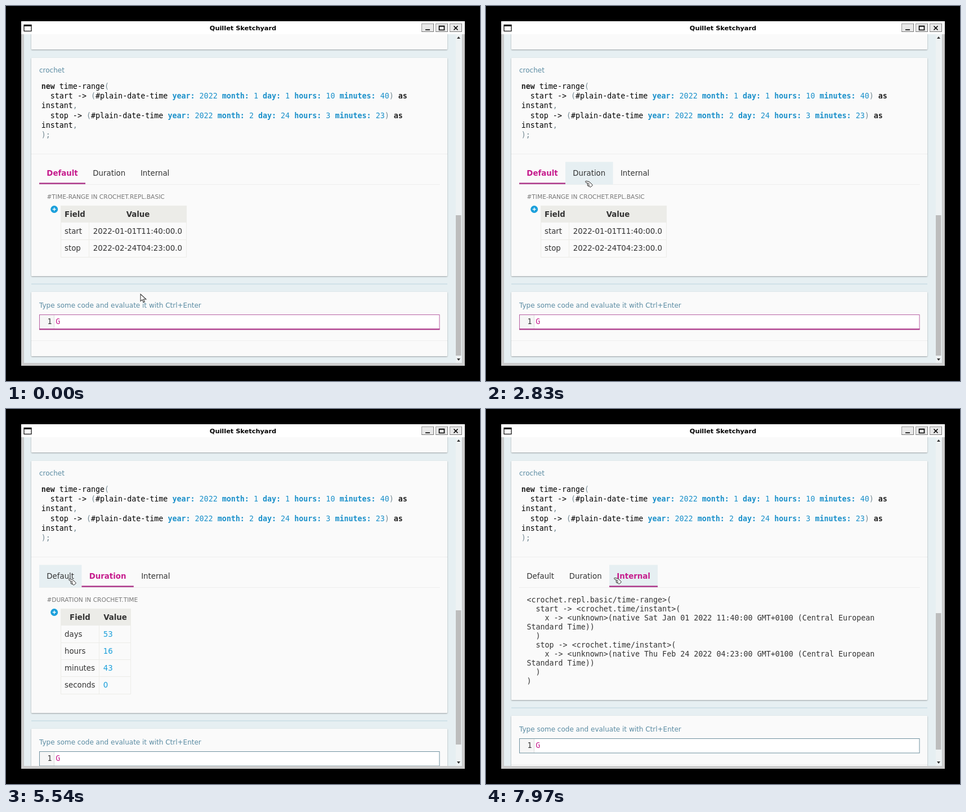
Write an HTML page that moves like this. It is 842 px wide and 665 px high and loops after 8000 ms.

```html
<!DOCTYPE html>
<html lang="en">
<head>
<meta charset="utf-8">
<title>Quillet Sketchyard</title>
<style>
html, body { margin: 0; width: 100%; height: 100%; overflow: hidden; background: #000; }
svg { display: block; }
text { white-space: pre; font: 13.333px "DejaVu Sans", sans-serif; fill: #333; }
.mono { font-family: "DejaVu Sans Mono", monospace; }
.code { fill: #000; }
.bold, .word, .key { font-weight: bold; }
.word { fill: #222; }
.key, .num { fill: #1a90ca; }
.punct { fill: #738892; }
.label { font-size: 12px; fill: #5b8ca3; }
.type { font-size: 10.667px; fill: #777; }
.title { font-size: 11.333px; font-weight: bold; fill: #000; }
.value { fill: #1a9fdb; }
.pink { fill: #c61c8d; }
.mid { text-anchor: middle; }
.card { fill: #fafafa; filter: drop-shadow(0 1px 1px #0005); }
.dots { stroke: #e2e2e2; stroke-dasharray: 1 1; }
.cell { fill: none; stroke: #ecece8; }
</style>
</head>
<body>
<svg id="stage" width="842" height="665" viewBox="0 0 842 665"></svg>
<script>
const LOOP = 8000;
const TABS = ["Default", "Duration", "Internal"];
const PLAIN_WIDTH = [75.4, 84.6, 78.4];
const ACTIVE_WIDTH = [82, 92.4, 86];
const BLUR_AT = 3470;
// time, selected tab
const SELECTIONS = [[0, 0], [3530, 1], [5770, 0], [7000, 2]];
// content shift, scroll thumb top and height for each tab
const LAYOUT = [[0, 371, 249], [60, 357, 238], [37, 362, 242]];
// time, x, y of the pointer
const PATH = [
  [0, 239, 511], [30, 239, 511], [400, 400, 580], [830, 630, 540], [860, 630, 540],
  [1260, 568, 432], [1450, 420, 300], [1630, 210, 256], [1720, 186, 292],
  [2130, 173, 306], [2400, 175, 309], [2570, 175, 309], [3330, 177, 311],
  [5000, 177, 311], [5370, 111, 301], [6070, 111, 301], [6670, 288, 305],
  [7870, 288, 305], [7970, 227, 299], [8000, 227, 299]
];

const escapeText = s => s.replace(/&/g, "&amp;").replace(/</g, "&lt;");
const text = (x, y, s, cls = "") => `<text x="${x}" y="${y}" class="${cls}">${escapeText(s)}</text>`;
const rect = (x, y, w, h, fill) => `<rect x="${x}" y="${y}" width="${w}" height="${h}" fill="${fill}"/>`;
const card = (y, h) => `<rect class="card" x="45" y="${y}" width="739" height="${h}" rx="1"/>`;
const path = (d, attrs) => `<path d="${d}" ${attrs}/>`;
const dots = (x1, x2, y) => path(`M${x1} ${y}H${x2}`, 'class="dots"');

const SOURCE = `new time-range(
  start -> (#plain-date-time year: 2022 month: 1 day: 1 hours: 10 minutes: 40) as
instant,
  stop -> (#plain-date-time year: 2022 month: 2 day: 24 hours: 3 minutes: 23) as
instant,
);`;

const INTERNAL = `<crochet.repl.basic/time-range>(
  start -> <crochet.time/instant>(
    x -> <unknown>(native Sat Jan 01 2022 11:40:00 GMT+0100 (Central European
Standard Time))
  )
  stop -> <crochet.time/instant>(
    x -> <unknown>(native Thu Feb 24 2022 04:23:00 GMT+0100 (Central European
Standard Time))
  )
)`;

function highlight(line) {
  return line.replace(/\b(new|as)\b|([a-z]+:)|(\d+)|([(),;]+)/g, (s, word, key, num) =>
    `<tspan class="${word ? "word" : key ? "key" : num ? "num" : "punct"}">${s}</tspan>`);
}

const sourceLines = () => SOURCE.split("\n").map((line, i) =>
  `<text x="62.7" y="${Math.round(146.6 + 17.33 * i)}" class="mono code">${highlight(line)}</text>`).join("");

const internalLines = () => INTERNAL.split("\n").map((line, i) =>
  text(72.4, Math.round(343 + 15.95 * i), line, "mono")).join("");

function table(type, split, right, rows, cls) {
  const bottom = Math.round(384.3 + 30.15 * rows.length) + .5;
  let out = text(72.4, 342, type, "type")
    + '<circle cx="85.7" cy="360.5" r="6.5" fill="#1a9fdb"/>'
    + path("M82.7 360.5h6M85.7 357.5v6", 'stroke="#fff" stroke-width="1.4"')
    + rect(97, 354, right - 97, 30, "#ecece8")
    + text((97 + split) / 2, 374, "Field", "bold mid")
    + text((split + right) / 2, 374, "Value", "bold mid")
    + path(`M97.5 384V${bottom}H${right - .5}V384M${split - .5} 384V${bottom}`, 'class="cell"');
  rows.forEach(([field, value], i) => {
    const y = Math.round(404 + 30.15 * i);
    if (i) out += path(`M97 ${y - 19.5}H${right}`, 'class="cell"');
    out += text(104, y, field) + text(split + 6.7, y, value, cls);
  });
  return out;
}

const panels = [
  table("#TIME-RANGE IN CROCHET.REPL.BASIC", 148, 321,
    [["start", "2022-01-01T11:40:00.0"], ["stop", "2022-02-24T04:23:00.0"]]),
  table("#DURATION IN CROCHET.TIME", 166, 222,
    [["days", "53"], ["hours", "16"], ["minutes", "43"], ["seconds", "0"]], "value"),
  internalLines()
];

const button = (x, icon) =>
  `<rect x="${x + .5}" y="31.5" width="21" height="14" fill="#e8e8e8" stroke="#999"/>`
  + path(`M${x + .5} 46V45.5H${x + 21.5}V31`, 'fill="none" stroke="#777"')
  + path(icon, 'fill="none" stroke="#000" stroke-width="1.6"');

const frame = rect(27, 27, 788, 611, "#ccc") + rect(27, 27, 788, 23, "#fff")
  + '<rect x="32" y="33.5" width="13" height="11" fill="#fff" stroke="#000" stroke-width="1.2"/>'
  + rect(32, 33, 13, 3, "#000")
  + text(421, 43, "Quillet Sketchyard", "title mid")
  + button(738, "M745 42.2h8") + button(763, "M769.5 35.5h9v7h-9zM769 36h10")
  + button(788, "M795.5 35.5l7 7m0-7l-7 7")
  + rect(32, 50, 778, 583, "#e6eff2");

const scrollbar = rect(799, 50, 10, 583, "#eef2f3")
  + path("M801 58l3-4 3 4zM801 625l3 4 3-4z", 'fill="#333"')
  + '<rect id="thumb" x="799" width="9.5" fill="#bdbdbd"/>';

const inputCard = rect(45, 492.5, 739, 1, "#bcd3e0") + card(507, 114)
  + text(59, 535, "Type some code and evaluate it with Ctrl+Enter", "label")
  + rect(59, 547, 711, 26, "#fff") + rect(60, 548, 25, 25, "#f6f6f6") + rect(85, 548, 1, 25, "#ddd")
  + text(73.5, 564, "1", "mono") + text(88.3, 564, "G", "mono pink")
  + '<rect id="border" x="59.5" y="547.5" width="710.5" height="25.5" fill="none"/>'
  + `<g id="focus">${rect(59, 572, 711.5, 2.4, "#b0408f")}</g>`
  + dots(45, 784, 593.5);

const ARROW = "M0 0V12L3 9.5L5 14L7 13L5 8.7H9.5Z";
const HAND = "M.5 1.5Q.5.5 1.8.5L7 1.5L10 4L13.5 7.8L9.5 11.3L6.8 9.5L4.8 9L4 7.5L5.3 6.5L3.8 5.7L4.6 4.3L1 2.6Z";

const pointers = `<g id="pointer">`
  + `<g>${path(ARROW, 'fill="#fff" stroke="#333" transform="scale(1.04)"')}</g>`
  + `<g>${path(ARROW, 'fill="#000" stroke="#fff" stroke-width=".5" transform="scale(.85)"')}</g>`
  + `<g>${path(HAND, 'fill="#fff" stroke="#222" stroke-width="1"')}`
  + path("M5 4.3l3 .8M5.5 6.5l2.2.4M6 8.5l2-.3", 'fill="none" stroke="#222" stroke-width=".8"') + "</g></g>";

const stage = document.getElementById("stage");
stage.innerHTML = '<clipPath id="view"><rect x="32" y="50" width="767" height="583"/></clipPath>'
  + frame + '<g clip-path="url(#view)">' + card(40, 37)
  + '<rect id="result" class="card" x="45" y="92" width="739" rx="1"/>'
  + text(59, 118, "crochet", "label") + sourceLines()
  + dots(45, 784, 262.5) + dots(59, 770, 316.5)
  + TABS.map(name => `<g class="tab">${rect(0, 276.5, 0, 40, "#e6eff2")}${rect(0, 313.4, 0, 2.6, "#b0408f")}${text(0, 301, name)}</g>`).join("")
  + panels.map(p => `<g class="panel">${p}</g>`).join("")
  + `<g id="input">${inputCard}</g></g>` + scrollbar + pointers;

const get = id => document.getElementById(id);
const set = (el, attrs) => Object.entries(attrs).forEach(([k, v]) => el.setAttribute(k, v));
const show = (el, on) => { el.style.display = on ? "" : "none"; };
const tabs = [...document.querySelectorAll(".tab")];
const panelNodes = [...document.querySelectorAll(".panel")];
const pointerNodes = [...get("pointer").children];

function pointerAt(t) {
  const i = PATH.findIndex(p => p[0] > t);
  const [a, b] = [PATH[i - 1], PATH[i]];
  const k = (t - a[0]) / (b[0] - a[0]);
  return [1, 2].map(n => Math.round(a[n] + (b[n] - a[n]) * k));
}

function render(t) {
  const selected = SELECTIONS.filter(s => s[0] <= t).pop()[1];
  const [shift, thumbTop, thumbHeight] = LAYOUT[selected];
  const [px, py] = pointerAt(t);
  const focused = t < BLUR_AT;
  let left = 59, overTab = false;

  tabs.forEach((tab, i) => {
    const active = i === selected;
    const width = (active ? ACTIVE_WIDTH : PLAIN_WIDTH)[i];
    const hover = py >= 277 && py < 317 && px >= left && px < left + width;
    const [back, line, name] = tab.children;
    set(back, { x: left, width });
    set(line, { x: left, width });
    set(name, { x: left + 13.33, class: active ? "bold pink" : "" });
    show(back, hover);
    show(line, active);
    overTab ||= hover;
    left += width;
  });

  panelNodes.forEach((panel, i) => show(panel, i === selected));
  set(get("result"), { height: 387 + shift });
  set(get("input"), { transform: `translate(0 ${shift})` });
  set(get("border"), { stroke: focused ? "#b75fa3" : "#6f919f" });
  show(get("focus"), focused);
  set(get("thumb"), { y: thumbTop, height: thumbHeight });

  const shape = overTab ? 2 : t < 30 ? 0 : 1;
  pointerNodes.forEach((node, i) => show(node, i === shape));
  set(get("pointer"), { transform: `translate(${px} ${py})` });
}

const start = performance.now();
function tick() {
  render((performance.now() - start) % LOOP);
  requestAnimationFrame(tick);
}
tick();
</script>
</body>
</html>
```
